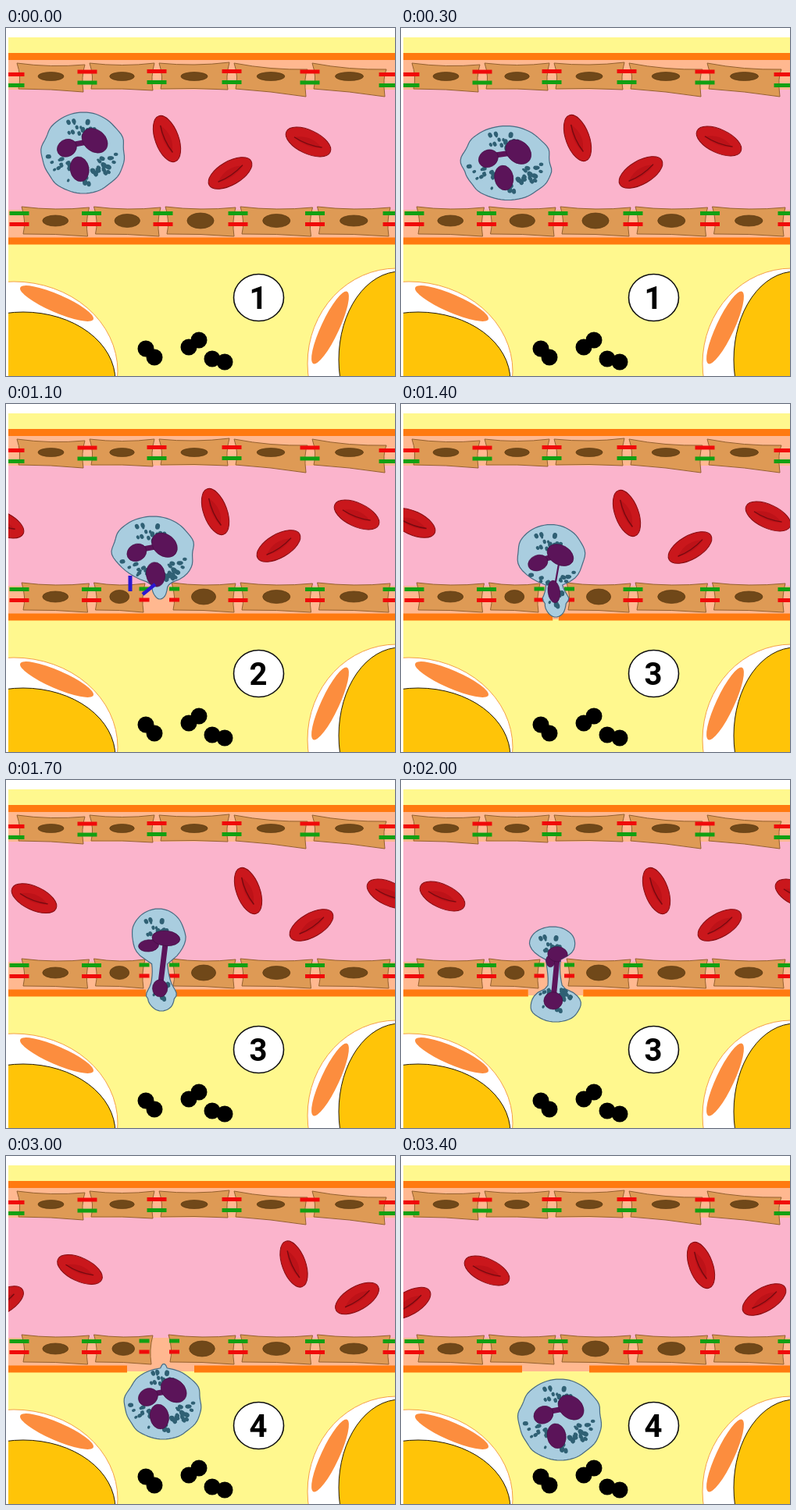
These frames come from a looping animation (498 px wide and 446 px high, 3500 ms). An HTML page with a canvas:

```html
<!DOCTYPE html>
<html lang="en">
<head>
<meta charset="utf-8">
<title>White blood cell leaving a vessel</title>
<style>
html, body { margin: 0; width: 100%; height: 100%; overflow: hidden; background: #fff; }
canvas { display: block; }
</style>
</head>
<body>
<canvas id="stage" width="498" height="446"></canvas>
<script>
const ctx = document.getElementById('stage').getContext('2d');
const LOOP = 3500, STEP = 100;
const RED = '#f00a0a', GREEN = '#12a012', BLUE = '#2a18d0', PURPLE = '#5b1459';
const YELLOW = '#fff88e', PEACH = '#ffb890', ORANGE = '#ff7a10';

const clamp = k => Math.min(1, Math.max(0, k));
const mix = (a, b, k) => a + (b - a) * k;
const ramp = (t, from, to) => clamp((t - from) / (to - from));
const smooth = k => k * k * (3 - 2 * k);

// Linear interpolation in a table of [time, ...values].
function at(keys, t) {
  const i = Math.max(1, keys.findIndex(k => k[0] >= t));
  const a = keys[i - 1], b = keys[i];
  if (t > keys[keys.length - 1][0]) return keys[keys.length - 1].slice(1);
  return a.map((v, n) => mix(v, b[n], ramp(t, a[0], b[0]))).slice(1);
}

let seed = 11;
const rnd = () => (seed = seed * 16807 % 2147483647) / 2147483647;

function paint(fill, stroke, width = 1) {
  if (fill) { ctx.fillStyle = fill; ctx.fill(); }
  if (stroke) { ctx.strokeStyle = stroke; ctx.lineWidth = width; ctx.stroke(); }
}
function rect(x, y, w, h, color) {
  ctx.fillStyle = color;
  ctx.fillRect(x, y, w, h);
}
function oval(x, y, rx, ry, deg, fill, stroke, width) {
  ctx.beginPath();
  ctx.ellipse(x, y, rx, ry, deg * Math.PI / 180, 0, Math.PI * 2);
  paint(fill, stroke, width);
}
function line(x1, y1, x2, y2, color, width) {
  ctx.beginPath();
  ctx.moveTo(x1, y1);
  ctx.lineTo(x2, y2);
  paint(null, color, width);
}

// --- vessel wall: cells lie between neighbouring gaps, joints bridge the gaps ---
const topGaps = [11, 104, 193, 289, 389, 490];
const lowGaps = [17, 109.5, 201, 297, 395.5, 495];
const topTilt = [2, 0, -1, 8, 8];
const GATE = 2;

function wallCell(left, right, top, bottom, tilt, ry) {
  const mid = (top + bottom) / 2, cx = (left + right) / 2;
  ctx.beginPath();
  ctx.moveTo(left, top);
  ctx.quadraticCurveTo(cx, top + tilt / 2 + 5, right, top + tilt);
  ctx.quadraticCurveTo(right - 5, mid, right - 2, bottom + tilt);
  ctx.quadraticCurveTo(cx, bottom + tilt / 2 - 3, left + 2, bottom - 2);
  ctx.quadraticCurveTo(left + 6, mid, left, top);
  paint('#de9a55', '#94602f');
  oval(cx, mid - 0.5, (right - left) * 0.19, ry, 0, '#704819', '#5c3a12', 0.7);
}

function joint(x, red, green, w = 25) {
  rect(x - w / 2, red - 2.5, w, 5, RED);
  rect(x - w / 2, green - 2.5, w, 5, GREEN);
}

function walls(t) {
  const open = ramp(t, 500, 1000) - ramp(t, 2800, 3200);
  const broken = t >= 400 && t < 3100;
  for (let i = 0; i < 5; i++) {
    wallCell(topGaps[i] + 3, topGaps[i + 1] - 3, 45, 80, topTilt[i], 5.5);
    const left = lowGaps[i] + 3 + (i === GATE ? 8 * open : 0);
    const right = lowGaps[i + 1] - 3 - (i === GATE - 1 ? 20 * open : 0);
    wallCell(left, right, 229, 266, 1, 10 - 1.5 * Math.abs(i - 2));
  }
  for (const x of topGaps) {
    const sag = 4 * ((x - 250) / 240) ** 4;
    joint(x, 55.5 + sag, 69.5 + sag);
  }
  lowGaps.forEach((x, i) => {
    if (i === GATE && broken) {
      joint(177, 251, 237, 13);
      joint(215.5, 251, 237, 13);
    } else joint(x, 251.5, 237.5);
  });
}

// --- red cells ---
const flow = [[0, 0, 0], [600, 40, -2], [1100, 62, -4], [1700, 104, 0],
  [2000, 121, 0], [2600, 147, -5], [3400, 178, -2]];

function redCell(x, y, deg) {
  ctx.save();
  ctx.translate(x, y);
  ctx.rotate(deg * Math.PI / 180);
  oval(0, 0, 31, 15, 0, '#ca171c', '#850d12');
  ctx.beginPath();
  ctx.moveTo(-19, 2);
  ctx.quadraticCurveTo(0, -11, 19, 0);
  ctx.quadraticCurveTo(0, 9, -19, 2);
  paint('#bd1218');
  ctx.beginPath();
  ctx.moveTo(-19, 2);
  ctx.quadraticCurveTo(0, 5, 19, -1);
  paint(null, '#760a10', 1.4);
  ctx.restore();
}

function redCells(t) {
  const [dx, dy] = at(flow, t), wrap = 455;
  redCell(206 + dx, 142 + dy, 70);
  for (const back of [0, wrap]) {
    redCell(287 + dx - back, 186 + dy + back / 100, -30);
    redCell(387 + dx - back, 146 + dy + (back ? 3 + 18 * (1 - ramp(t, 0, 2000)) : 0), 25);
  }
}

// --- white cell: an upper and a lower bulb (x, y, rx, ry each) joined by a neck ---
const body = [
  [0, 99, 160, 53, 52, 99, 170, 15, 15, 0],
  [600, 170, 186, 61, 43, 175, 200, 20, 15, 0],
  [1100, 188, 187, 52, 43, 197, 232, 10, 18, 10],
  [1700, 195, 200, 34, 35, 199, 278, 17, 18, 10],
  [2000, 194, 209, 29, 21, 198, 288, 32, 22, 8],
  [2600, 201, 245, 6, 17, 198, 297, 45, 39, 6],
  [3400, 203, 325, 6, 20, 204, 338, 53, 52, 0]
];
// across, down (in half sizes), rx, ry, turn, and the shift down while squeezed
const lobes = [[-0.4, -0.12, 13, 11, -30, -0.18], [0.29, -0.3, 18, 14, 40, -0.14],
  [-0.1, 0.4, 12, 16, -10, 0.18]];

function cellShape(t) {
  const [x1, y1, rx1, ry1, x2, y2, rx2, ry2, neck] = at(body, t);
  const top = Math.min(y1 - ry1, y2 - ry2), bottom = Math.max(y1 + ry1, y2 + ry2);
  const mid = (top + bottom) / 2, tall = (bottom - top) / 2;
  const bulb = (y, c, rx, ry) => rx * Math.sqrt(Math.max(0, 1 - ((y - c) / ry) ** 2));
  const axis = y => mix(x1, x2, smooth(ramp(y, y1, y2)));
  const half = y => {
    const q = ramp(y, y1, y2);
    const tube = q > 0 && q < 1 ? Math.min(neck * (1 + (2 * q - 1) ** 2), mix(rx1, rx2, q)) : 0;
    const sum = [bulb(y, y1, rx1, ry1), bulb(y, y2, rx2, ry2), tube]
      .reduce((s, w) => s + w ** 6, 0);
    return sum ** (1 / 6);
  };
  const place = (u, v) => {
    const y = mid + tall * v;
    return [axis(y) + u * half(y), y];
  };
  return { half, place };
}

// Granules gather above, to the lower right and to the lower left of the nucleus.
const granules = [];
while (granules.length < 54) {
  const turn = [-95, 30, 60, 145][granules.length % 4] + (rnd() - 0.5) * 60;
  const r = 0.4 + 0.45 * rnd();
  const v = r * Math.sin(turn * Math.PI / 180);
  const u = r * Math.cos(turn * Math.PI / 180) / Math.sqrt(1 - v * v);
  if (lobes.every(l => Math.hypot(u - l[0], v - l[1]) > 0.25))
    granules.push({ u, v, turn, size: 1.5 + 1.6 * rnd() });
}

function whiteCell(t) {
  const { half, place } = cellShape(t);
  const squeeze = Math.exp(-(((t - 1850) / 400) ** 2));
  const rows = 40;
  ctx.save();
  ctx.beginPath();
  for (let i = 0; i < 2 * rows; i++) {
    const a = i / rows * Math.PI;
    const ripple = 1 + 0.02 * Math.sin(7 * a) + 0.012 * Math.sin(12 * a);
    ctx.lineTo(...place((i < rows ? 1 : -1) * ripple, -Math.cos(a)));
  }
  ctx.closePath();
  paint('#a9cddf', '#486b82', 1.2);
  ctx.clip();
  for (const { u, v, turn, size } of granules) {
    const [x, y] = place(u, v);
    if (half(y) > 13) oval(x, y, size * 1.3, size, turn, '#2f6074');
  }
  const spots = lobes.map(([u, v, rx, ry, deg, shift]) => {
    const [x, y] = place(u, v + shift * squeeze);
    return [x, y, Math.min(rx, half(y) * 0.6), ry * (1 - 0.35 * squeeze), deg * (1 - squeeze)];
  });
  const [a, b, c] = spots;
  ctx.lineCap = 'round';
  line(a[0], a[1] - 3, b[0], b[1], PURPLE, 7);
  if (squeeze > 0.1) line(b[0], b[1], c[0], c[1], PURPLE, 8 * squeeze);
  for (const s of spots) oval(...s, PURPLE, '#3f0d40', 0.6);
  ctx.restore();
}

function anchors(t) {
  if (t < 400 || t >= 1300) return;
  const k = ramp(t, 600, 1100);
  const x = mix(132.5, 159, k);
  line(x, 220, x, 240, BLUE, 5);
  line(mix(185.5, 191, k), mix(220, 231, k), mix(185.5, 175, k), mix(240, 244, k), BLUE, 4.5);
}

function tissue(label) {
  oval(10, 440, 133, 115, 0, '#fff', '#f5a04a');
  oval(22, 452, 118, 88, 0, '#ffc408', '#241a00');
  oval(65, 353, 51, 11.5, 23.5, '#fc8d3e');
  oval(500, 430, 114, 122, 0, '#fff', '#f5a04a');
  oval(505, 425, 79, 113, 0, '#ffc408', '#241a00');
  oval(415, 384, 51, 11.5, -65, '#fc8d3e');
  for (const [x, y, dx, dy] of [[179, 411, 11, 11], [234, 409, 13, -9], [264, 424, 16, 4]]) {
    oval(x, y, 10.5, 10.5, 0, '#000');
    oval(x + dx, y + dy, 10.5, 10.5, 0, '#000');
  }
  oval(323.5, 345.5, 32, 30, 0, '#fff', '#111', 1.6);
  ctx.fillStyle = '#000';
  ctx.font = 'bold 40px Roboto, Arial, sans-serif';
  ctx.textAlign = 'center';
  ctx.fillText(label, 323, 360);
}

function vessel(t) {
  rect(3, 12, 495, 434, YELLOW);
  rect(3, 41, 495, 228, '#fbb4cc');
  rect(3, 41, 495, 38, PEACH);
  rect(3, 233, 495, 36, PEACH);
  rect(3, 32, 495, 9, ORANGE);
  rect(3, 268.5, 495, 9, ORANGE);
  const hole = 43 * smooth(ramp(t, 1200, 2300));
  rect(198 - hole, 268, 2 * hole, 10, YELLOW);
  rect(198 - hole, 268, 2 * hole, 8, PEACH);
}

function draw(t) {
  rect(0, 0, 498, 446, '#fff');
  ctx.save();
  ctx.beginPath();
  ctx.rect(3, 12, 495, 434);
  ctx.clip();
  vessel(t);
  tissue(1 + [800, 1300, 2300].filter(s => t >= s).length);
  walls(t);
  redCells(t);
  whiteCell(t);
  anchors(t);
  ctx.restore();
}

const start = performance.now();
function tick() {
  const t = (performance.now() - start) % LOOP;
  draw(Math.floor(t / STEP) * STEP);
  requestAnimationFrame(tick);
}
tick();
</script>
</body>
</html>
```
